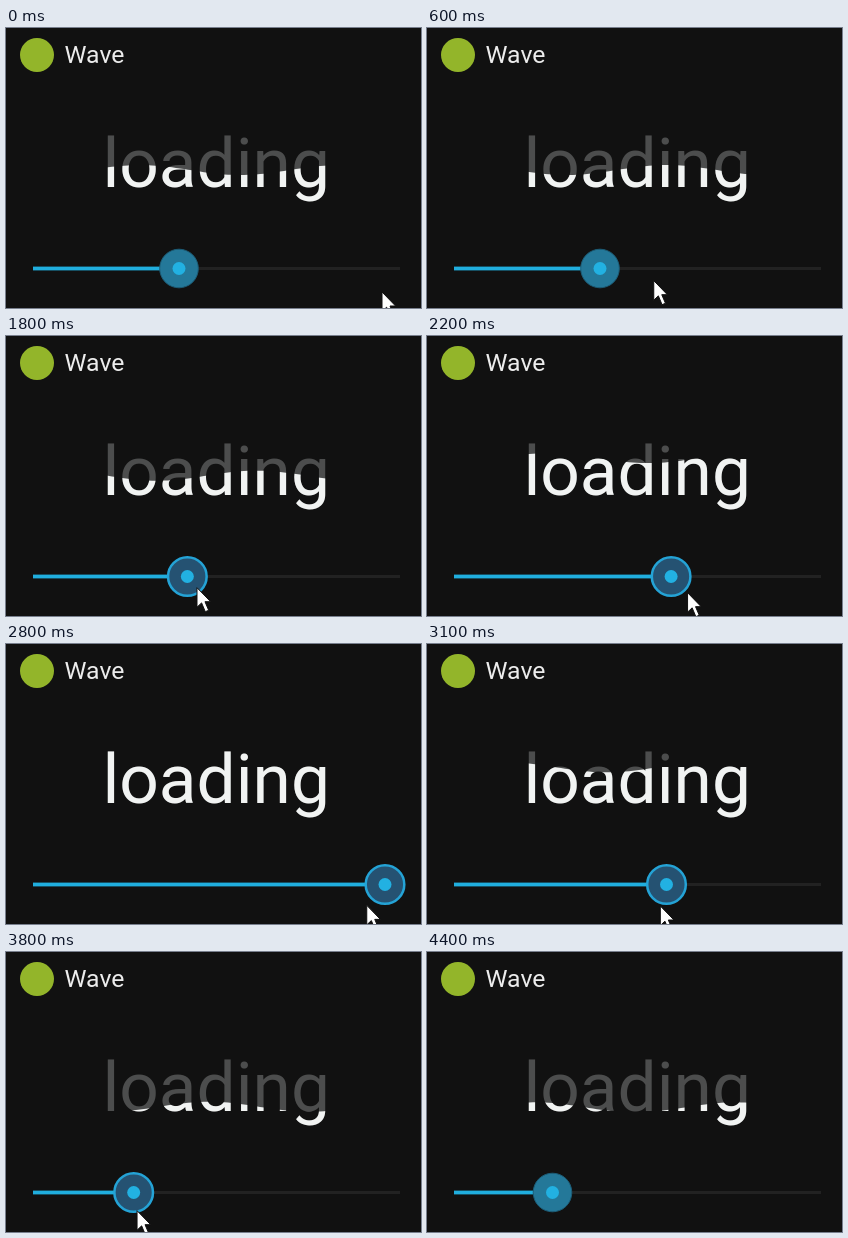
These frames come from a looping animation (415 by 280 pixels, 4.5 s). An HTML page:

```html
<!DOCTYPE html>
<html lang="en">
<head>
<meta charset="utf-8">
<title>Wave</title>
<style>
  html, body { margin: 0; width: 100%; height: 100%; overflow: hidden; background: #111; }
  svg { display: block; width: 415px; height: 280px; }
  text { font-family: Roboto, "Liberation Sans", sans-serif; }
  .title { font-size: 24.8px; fill: #ececec; }
  .word { font-size: 69.4px; }
  .halo { fill: #247899; stroke: #1c5c76; stroke-width: 1; }
  .pressed .halo { fill: #255272; stroke: #24a3d6; stroke-width: 2.5; }
</style>
</head>
<body>
<svg viewBox="0 0 415 280">
  <defs>
    <clipPath id="water"><path id="wave"/></clipPath>
  </defs>
  <rect width="415" height="280" fill="#111"/>
  <circle cx="31" cy="27" r="17" fill="#93b52a"/>
  <text class="title" x="58.5" y="35.3">Wave</text>

  <text class="word" x="96.4" y="158.5" fill="#4c4d4d">loading</text>
  <g clip-path="url(#water)">
    <text class="word" x="96.4" y="158.5" fill="#f1f3f2">loading</text>
  </g>

  <rect x="27" y="239" width="367" height="3" fill="#222"/>
  <rect id="bar" x="27" y="238.6" height="3.8" fill="#20aede"/>
  <g id="thumb">
    <circle class="halo" r="19.3"/>
    <circle r="6.5" fill="#22b1e2"/>
  </g>
  <path id="cursor" d="M0 0V19.5L4.6 15.2L8.3 24L11.7 22.6L8 14H13.6Z" fill="#fff" stroke="#111"/>
</svg>
<script>
  const LOOP = 4500, STEP = 100;
  const LEFT = 27, LENGTH = 367;
  const WAVELENGTH = 200, HEIGHT = 5, SPEED = 0.176, CREST = 134;
  const GRAB = 1600, RELEASE = 3900;

  const el = id => document.getElementById(id);
  const wave = el("wave"), bar = el("bar"), thumb = el("thumb"), cursor = el("cursor");

  const span = (t, from, to) => Math.min(1, Math.max(0, (t - from) / (to - from)));
  const mix = (a, b, u) => a + (b - a) * u;
  const easeIn = u => 1 - Math.cos(u * Math.PI / 2);
  const easeOut = u => Math.sin(u * Math.PI / 2);

  // Dragged right, then quickly back and slowing down
  function thumbX(t) {
    return 173
      + 206 * easeIn(span(t, GRAB, 2700))
      - 139.5 * span(t, 2800, 3100)
      - 114 * easeOut(span(t, 3100, RELEASE));
  }

  // While dragging, the pointer runs slightly ahead of the thumb
  function held(t) {
    return [thumbX(t + 50) + 5, 249 + 13 * Math.sin((t - GRAB) / 3000 * Math.PI)];
  }

  function pointer(t) {
    const [x, y] = held(Math.min(RELEASE, Math.max(GRAB, t)));
    if (t < GRAB) {
      const u = easeOut(span(t, 0, 1100));
      return [mix(376, x, u), mix(264, y, u)];
    }
    const u = span(t, RELEASE, 4200);
    return [mix(x, 55, u), mix(y, 285, u)];
  }

  function wavePath(level, crest) {
    let d = "M90 200";
    for (let x = 90; x <= 330; x += 4) {
      const y = level - HEIGHT * Math.cos((x - crest) / WAVELENGTH * 2 * Math.PI);
      d += `L${x} ${y.toFixed(2)}`;
    }
    return d + "L330 200Z";
  }

  function draw(t) {
    const x = thumbX(t);
    const progress = (x - LEFT) / LENGTH;
    wave.setAttribute("d", wavePath(183 - 103 * progress, CREST + SPEED * t));
    bar.setAttribute("width", x - LEFT);
    thumb.setAttribute("transform", `translate(${x} 240.5)`);
    thumb.classList.toggle("pressed", t >= GRAB && t <= RELEASE);
    cursor.setAttribute("transform", `translate(${pointer(t)})`);
  }

  const start = performance.now();
  function tick() {
    const t = (performance.now() - start) % LOOP;
    draw(Math.floor(t / STEP) * STEP);
    requestAnimationFrame(tick);
  }
  tick();
</script>
</body>
</html>
```
